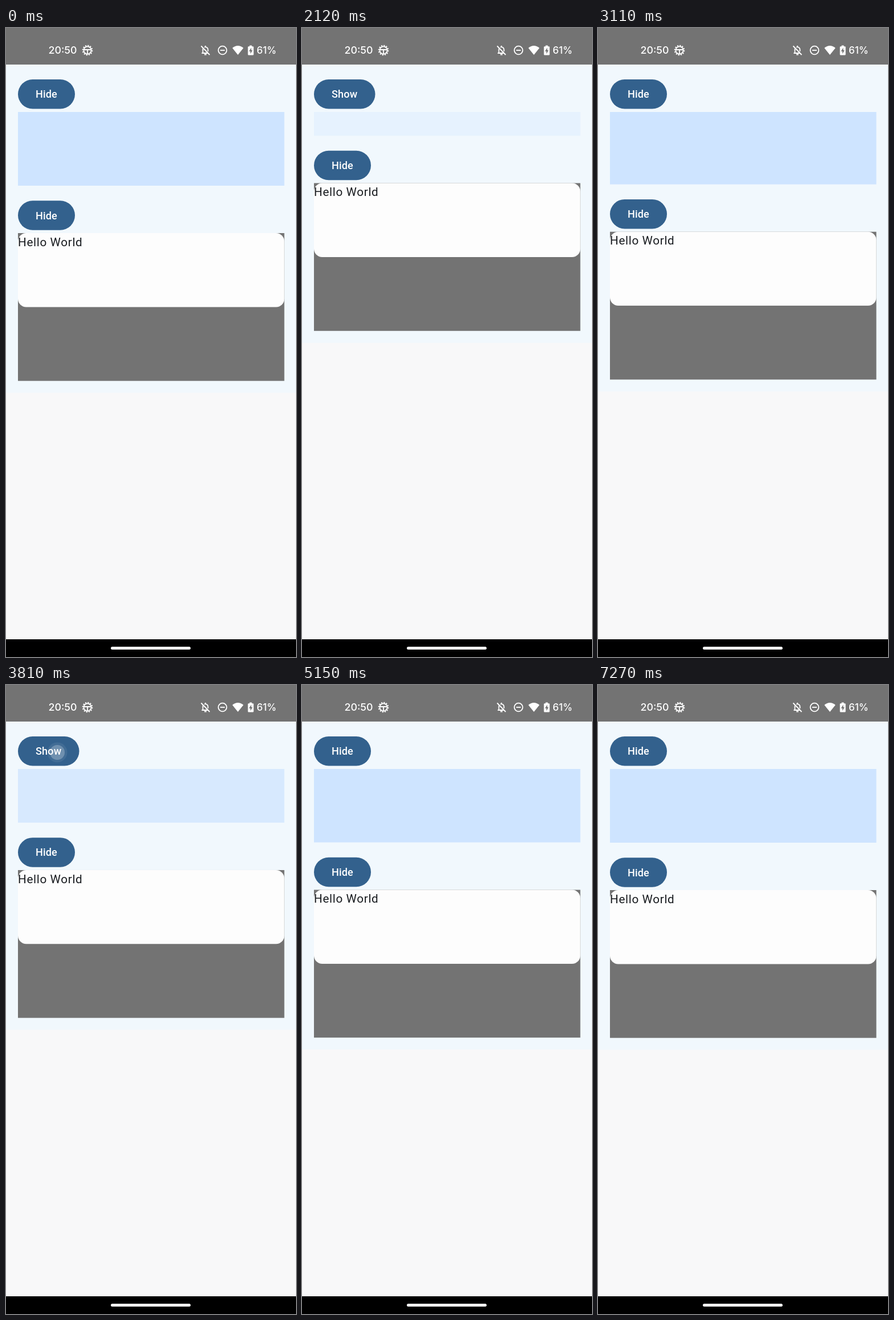
These frames come from a looping animation (509x1101 px, 7360 ms). An HTML page:

```html
<!DOCTYPE html>
<html lang="en">
<head>
<meta charset="utf-8">
<title>Animated visibility</title>
<style>
html, body { margin: 0; width: 100%; height: 100%; overflow: hidden; background: #f8f8f9; }
svg { display: block; }
.label { font: 500 18.1px Roboto, sans-serif; letter-spacing: .13px; fill: #fff; }
.body { font: 400 20.7px Roboto, sans-serif; letter-spacing: .65px; fill: #191c20; }
.status { font-family: Inter, sans-serif; font-weight: 500; fill: #fff; }
.line { fill: none; stroke: #fff; stroke-width: 1.8; }
</style>
</head>
<body>
<svg width="509" height="1101" viewBox="0 0 509 1101">
  <rect width="509" height="1101" fill="#f8f8f9"/>
  <rect id="page" y="64" width="509" height="574.5" fill="#f1f8fd"/>

  <rect id="toggle" x="21" y="90" width="100" height="51.5" rx="25.75" fill="#33618d"/>
  <text id="label" class="label" x="52" y="122.4">Hide</text>
  <g id="touch" fill="#fff" opacity="0">
    <circle r="17.5" opacity=".2"/>
    <circle r="13" opacity=".8"/>
  </g>
  <rect id="box" x="21" y="147" width="467.5" height="129" fill="#cee4ff"/>

  <g id="lower">
    <rect x="21" y="302.2" width="100" height="51.5" rx="25.75" fill="#33618d"/>
    <text class="label" x="52" y="334.5">Hide</text>
    <rect x="21" y="359" width="467.5" height="258.7" fill="#737373"/>
    <rect x="21" y="359" width="467.5" height="129.4" rx="14.5" fill="#fdfdfd"/>
    <text class="body" x="21" y="381.8">Hello World</text>
  </g>

  <rect width="509" height="64" fill="#737373"/>
  <text class="status" x="74.5" y="45.3" font-size="17.8">20:50</text>
  <g transform="translate(143 39)" class="line">
    <circle r="6.6"/>
    <circle r="8.3" stroke-width="2" stroke-dasharray="2.2 2.146"/>
    <path d="M-6-1H6M0-1V6"/>
  </g>
  <g transform="translate(350 39)" class="line" stroke-width="1.7">
    <path d="M-4.5 5V-1Q-4.5-3-3.4-4M-1.8-5.2Q0-6 1.8-5.2 4.5-4 4.5-1V2M-6.5 5H4M-7.5-7.5 7.5 8"/>
    <path d="M0-8V-5.5M-1.8 7.3H1.8" stroke-width="2.2"/>
  </g>
  <g transform="translate(380 39)" class="line">
    <circle r="7.4"/>
    <path d="M-4 0H4"/>
  </g>
  <path d="M397.3 35Q407 27.2 416.7 35L407 47Z" fill="#fff"/>
  <path d="M427.5 30.5H431.5V32.2H433.3Q434.6 32.2 434.6 33.5V46.2Q434.6 47.5 433.3 47.5H425.9Q424.6 47.5 424.6 46.2V33.5Q424.6 32.2 425.9 32.2H427.5Z" fill="#fff"/>
  <path d="M430.4 34.5 426.5 40.8H429V45.3L432.7 38.8H430.4Z" fill="#737373"/>
  <text class="status" x="440" y="45.3" font-size="17">61%</text>

  <rect y="1070" width="509" height="31" fill="#000"/>
  <rect x="184" y="1083" width="140" height="5" rx="2.5" fill="#fff"/>
</svg>
<script>
const LOOP = 7360, FULL = 129, OMEGA = 0.02;
const taps = [
  { at: 2004, show: 0, x: 90, y: 116 },
  { at: 2813, show: 1, x: 92, y: 114 },
  { at: 3760, show: 0, x: 90, y: 118 },
  { at: 4764, show: 1, x: 97, y: 109 }
];
const $ = id => document.getElementById(id);
const [page, toggle, label, touch, box, lower] =
  ["page", "toggle", "label", "touch", "box", "lower"].map($);
const clamp = v => Math.max(0, Math.min(1, v));

// Critically damped spring: the part of the distance still to go.
const spring = ms => (1 + OMEGA * ms) * Math.exp(-OMEGA * ms);

function visibility(t) {
  const tap = taps.filter(p => p.at <= t).pop();
  if (!tap) return { shown: 1, part: 1 };
  const ms = t - tap.at;
  const rest = ms > 500 ? 0 : spring(ms);
  return { shown: tap.show, part: tap.show ? 1 - rest : rest };
}

function drawTouch(t) {
  const tap = taps.find(p => t > p.at - 80 && t < p.at + 98);
  touch.setAttribute("opacity", tap ? 0.42 * clamp((tap.at + 98 - t) / 56) : 0);
  if (tap) touch.setAttribute("transform", `translate(${tap.x} ${tap.y})`);
}

function draw(t) {
  const { shown, part } = visibility(t);
  const shift = FULL * (1 - part);
  label.textContent = shown ? "Hide" : "Show";
  toggle.setAttribute("width", shown ? 100 : 107.5);
  box.setAttribute("height", FULL * part);
  box.setAttribute("opacity", part);
  lower.setAttribute("transform", `translate(0 ${-shift})`);
  page.setAttribute("height", 574.5 - shift);
  drawTouch(t);
}

const start = performance.now();
function tick() {
  draw((performance.now() - start) % LOOP);
  requestAnimationFrame(tick);
}
tick();
</script>
</body>
</html>
```
